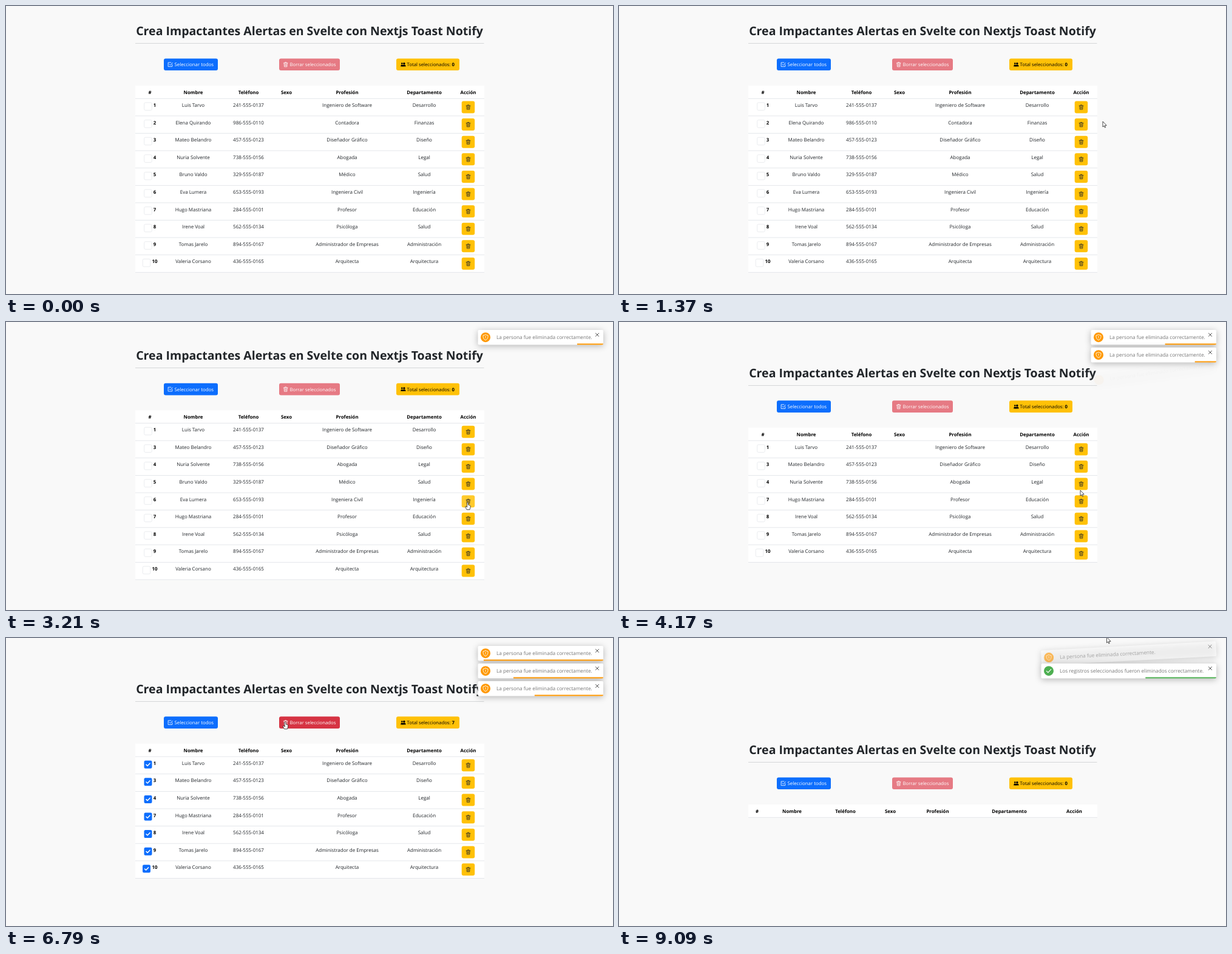
Animation of 1000 by 474 pixels, one loop 9.19 s. Source, as an HTML page with a canvas:

```html
<!DOCTYPE html>
<html lang="es">
<head>
<meta charset="utf-8">
<title>Alertas</title>
<style>
html, body { margin: 0; width: 100%; height: 100%; overflow: hidden; background: #f9f9f9; }
canvas { display: block; width: 1000px; height: 474px; }
</style>
</head>
<body>
<canvas id="stage"></canvas>
<script>
const W = 1000, H = 474, LOOP = 9190;
const canvas = document.getElementById('stage');
const ratio = window.devicePixelRatio || 1;
canvas.width = W * ratio;
canvas.height = H * ratio;
const ctx = canvas.getContext('2d');
ctx.scale(ratio, ratio);
ctx.textRendering = 'geometricPrecision';

const FONT = '"Open Sans", "Noto Sans", sans-serif';
const INK = '#212529', BLUE = '#0d6efd', YELLOW = '#ffc107';
const ROW = 28.6;

const HEADERS = ['#', 'Nombre', 'Teléfono', 'Sexo', 'Profesión', 'Departamento', 'Acción'];
const COLUMNS = [237, 308.5, 399.5, 462, 562, 689, 761.5];
const EMPTY_COLUMNS = [227.5, 285, 373, 447, 525, 643, 750];

const PEOPLE = [
  ['Luis Tarvo', '241-555-0137', 'Ingeniero de Software', 'Desarrollo'],
  ['Elena Quirando', '986-555-0110', 'Contadora', 'Finanzas'],
  ['Mateo Belandro', '457-555-0123', 'Diseñador Gráfico', 'Diseño'],
  ['Nuria Solvente', '738-555-0156', 'Abogada', 'Legal'],
  ['Bruno Valdo', '329-555-0187', 'Médico', 'Salud'],
  ['Eva Lumera', '653-555-0193', 'Ingeniera Civil', 'Ingeniería'],
  ['Hugo Mastriana', '284-555-0101', 'Profesor', 'Educación'],
  ['Irene Voal', '562-555-0134', 'Psicóloga', 'Salud'],
  ['Tomas Jarelo', '894-555-0167', 'Administrador de Empresas', 'Administración'],
  ['Valeria Corsano', '436-555-0165', 'Arquitecta', 'Arquitectura']
].map((cells, i) => ({ id: i + 1, cells }));

const SELECT_ALL = 5100, CLEAR_ALL = 7150;
const REMOVED_AT = { 2: 2210, 6: 3350, 5: 4160 };

const ONE = 'La persona fue eliminada correctamente.';
const MANY = 'Los registros seleccionados fueron eliminados correctamente.';
const TOASTS = [
  { start: 2210, text: ONE },
  { start: 3350, text: ONE },
  { start: 4160, text: ONE },
  { start: CLEAR_ALL, text: MANY, success: true }
];
const TOAST_LIFE = 4800, TOAST_IN = 300, TOAST_OUT = 350, TILT = -8 * Math.PI / 180;

// time, x, y of the pointer tip
const POINTER = [
  [1220, 812, 191], [1370, 797, 190], [1470, 793, 191], [1630, 793, 191],
  [2000, 761, 193], [2630, 761, 193], [3100, 760.5, 297], [3600, 760.5, 297],
  [3950, 760, 277], [4550, 760, 277], [5000, 319.5, 141], [5550, 319.5, 141],
  [6430, 452, 152], [6530, 452, 152], [6750, 460, 138], [7200, 460, 138]
];
const POINTER_BACK = [[8820, 804, -12], [8930, 803.5, -1], [LOOP, 803.5, -1]];

const clamp = v => Math.max(0, Math.min(1, v));
const smooth = v => v * v * (3 - 2 * v);

function follow(path, t) {
  for (let i = 1; i < path.length; i++) {
    const [t0, x0, y0] = path[i - 1], [t1, x1, y1] = path[i];
    if (t >= t0 && t < t1) {
      const k = smooth((t - t0) / (t1 - t0));
      return { x: x0 + (x1 - x0) * k, y: y0 + (y1 - y0) * k };
    }
  }
  return null;
}

function label(text, x, y, size, { bold = false, color = INK, align = 'center' } = {}) {
  ctx.font = `${bold ? 700 : 400} ${size}px ${FONT}`;
  ctx.fillStyle = color;
  ctx.textAlign = align;
  ctx.fillText(text, x, y);
  return ctx.measureText(text).width;
}

function box(x, y, w, h, r, fill) {
  ctx.beginPath();
  ctx.roundRect(x, y, w, h, r);
  ctx.fillStyle = fill;
  ctx.fill();
}

function trace(points, close) {
  ctx.beginPath();
  points.forEach(([x, y], i) => i ? ctx.lineTo(x, y) : ctx.moveTo(x, y));
  if (close) ctx.closePath();
}

function lines(color, width, ...paths) {
  ctx.strokeStyle = color;
  ctx.lineWidth = width;
  ctx.lineCap = ctx.lineJoin = 'round';
  for (const p of paths) { trace(p); ctx.stroke(); }
}

function at(x, y, draw) {
  ctx.save();
  ctx.translate(x, y);
  draw();
  ctx.restore();
}

function trashIcon(x, y, color) {
  at(x, y, () => lines(color, 0.75,
    [[-3.4, -2.4], [3.4, -2.4]],
    [[-1.3, -2.5], [-1.1, -3.7], [1.1, -3.7], [1.3, -2.5]],
    [[-2.7, -2.2], [-2.2, 3.7], [2.2, 3.7], [2.7, -2.2]],
    [[-0.9, -0.8], [-0.8, 2.3]], [[0.9, -0.8], [0.8, 2.3]]));
}

function checkIcon(x, y) {
  at(x, y, () => lines('#fff', 0.8,
    [[1.4, -3.3], [-3.4, -3.3], [-3.4, 3.4], [3.3, 3.4], [3.3, 0]],
    [[-1.7, -0.6], [0.1, 1.2], [3.9, -2.8]]));
}

function peopleIcon(x, y) {
  ctx.fillStyle = '#000';
  for (const [dx, r] of [[-2, 1.3], [1.6, 1.7]]) {
    ctx.beginPath();
    ctx.arc(x + dx, y - 1.7, r, 0, 7);
    ctx.fill();
    ctx.beginPath();
    ctx.ellipse(x + dx, y + 3.2, r * 1.6, 2.9, 0, Math.PI, 0);
    ctx.fill();
  }
}

const inside = (p, x, y, w, h) => !!p && p.x >= x && p.x <= x + w && p.y >= y && p.y <= y + h;

function checkbox(x, y, checked) {
  if (checked) {
    box(x - 6.5, y - 6.5, 13, 13, 2.2, BLUE);
    lines('#fff', 1.5, [[x - 3, y + 0.2], [x - 0.9, y + 2.2], [x + 3.1, y - 2]]);
  } else {
    box(x - 6.3, y - 6.3, 12.6, 12.6, 2, '#fff');
    ctx.strokeStyle = '#e1e4e8';
    ctx.lineWidth = 0.7;
    ctx.stroke();
  }
}

function page(t, pointer) {
  const rows = t >= CLEAR_ALL ? [] : PEOPLE.filter(p => !(t >= REMOVED_AT[p.id]));
  const selected = t >= SELECT_ALL && t < CLEAR_ALL;
  const top = (10 - rows.length) * ROW / 2;
  let hand = false;
  const hover = (...area) => {
    const hit = inside(pointer, ...area);
    hand = hand || hit;
    return hit;
  };

  label('Crea Impactantes Alertas en Svelte con Nextjs Toast Notify', 500, top + 48, 19.55, { bold: true });
  ctx.fillStyle = '#d5d7d8';
  ctx.fillRect(213, Math.round(top + 61), 574.5, 1);

  const by = top + 86.4, ty = top + 99.2, iy = top + 96.3;
  box(260, by, 89, 19.7, 3, hover(260, by, 89, 19.7) ? '#0b5ed7' : BLUE);
  checkIcon(270.5, iy);
  label('Seleccionar todos', 277.5, ty, 7.85, { color: '#fff', align: 'left' });

  const red = !selected ? '#e67a84' : hover(450, by, 100, 19.7) ? '#d63343' : '#dc3545';
  box(450, by, 100, 19.7, 3, red);
  trashIcon(460.7, iy, '#fff');
  label('Borrar seleccionados', 467.5, ty, 7.75, { color: '#fff', align: 'left' });

  box(643, by, 104, 19.7, 3, YELLOW);
  peopleIcon(654.3, iy);
  const w = label('Total seleccionados: ', 660.5, ty, 7.75, { color: '#000', align: 'left' });
  label(selected ? rows.length : 0, 660.5 + w, ty, 7.75, { bold: true, color: '#000', align: 'left' });

  const body = top + 152.3;
  ctx.fillStyle = '#fff';
  ctx.fillRect(213, top + 131, 575, 21.3 + rows.length * ROW);
  const columns = rows.length ? COLUMNS : EMPTY_COLUMNS;
  HEADERS.forEach((h, i) => label(h, columns[i], top + 144.8, 7.85, { bold: true, color: '#000' }));
  ctx.fillStyle = '#dee2e6';
  for (let i = 0; i <= rows.length; i++) ctx.fillRect(213, body + i * ROW - 0.4, 575, 0.8);

  rows.forEach(({ id, cells }, i) => {
    const y = body + i * ROW;
    checkbox(id > 9 ? 231.5 : 234, y + 13, selected);
    label(id, 245, y + 13.6, 7.85, { bold: true, color: '#000' });
    [1, 2, 4, 5].forEach((c, k) => label(cells[k], COLUMNS[c], y + 13.6, 8));
    const area = [750.7, y + 4.2, 21.5, 20];
    box(...area, 3, hover(...area) ? '#ffca2c' : YELLOW);
    trashIcon(761.5, y + 14.2, '#212529');
  });
  return hand;
}

function toastIcon(x, y, toast, age) {
  ctx.save();
  if (toast.success) ctx.globalAlpha *= 0.75 + 0.25 * Math.cos(age / 1000 * Math.PI);
  ctx.translate(x, y);
  ctx.beginPath();
  ctx.arc(0, 0, 8, 0, 7);
  ctx.fillStyle = toast.success ? '#4caf50' : '#ff9800';
  ctx.fill();
  if (toast.success) {
    lines('#fff', 1.2, [[-3.6, 0.2], [-1.2, 2.7], [3.7, -2.5]]);
  } else {
    ctx.beginPath();
    ctx.moveTo(0, -4.6);
    ctx.quadraticCurveTo(2, -3.1, 4, -3.2);
    ctx.quadraticCurveTo(4.6, 2.6, 0, 4.8);
    ctx.quadraticCurveTo(-4.6, 2.6, -4, -3.2);
    ctx.quadraticCurveTo(-2, -3.1, 0, -4.6);
    ctx.strokeStyle = '#fff';
    ctx.lineWidth = 0.9;
    ctx.stroke();
    lines('#fff', 0.9, [[0, -1.7], [0, 0.5]], [[0, 2], [0, 2.1]]);
  }
  ctx.restore();
}

function drawToast(toast, slot, width, t) {
  const age = t - toast.start;
  const gone = Math.max(1 - clamp(age / TOAST_IN), clamp((age - TOAST_LIFE) / TOAST_OUT));
  const h = 24.5;
  ctx.save();
  ctx.globalAlpha = 1 - gone;
  ctx.translate(984 - width / 2, 13 + slot * 29 + h / 2);
  ctx.rotate(TILT * gone);
  ctx.translate(-width / 2, -h / 2);

  ctx.shadowColor = 'rgba(0,0,0,0.28)';
  ctx.shadowBlur = 11 * ratio;
  ctx.shadowOffsetY = 2 * ratio;
  box(0, 0, width, h, 2, '#fff');
  ctx.shadowColor = 'transparent';

  toastIcon(12.5, 12.2, toast, age);
  label(toast.text, 30.5, 15.4, 8.24, { color: '#757575', align: 'left' });
  const cx = width - 10, cy = 8, d = 2.6;
  lines('#444', 0.9, [[cx - d, cy - d], [cx + d, cy + d]], [[cx + d, cy - d], [cx - d, cy + d]]);

  if (age < TOAST_LIFE) {
    const bar = width * age / TOAST_LIFE;
    box(width - bar, h - 2.1, bar, 2.1, [0, 0, 2, 0], toast.success ? '#4caf50' : '#ff9800');
  }
  ctx.restore();
}

function drawPointer({ x, y }, hand) {
  at(x, y, () => {
    if (hand) {
      trace([[-1, 0.6], [-0.4, 0], [0.4, 0], [1, 0.6], [1.1, 4], [3.8, 4.7], [4.6, 5.6],
        [4.5, 8.4], [3.5, 11.8], [-1.4, 11.8], [-3.7, 8], [-3.5, 6.7], [-2.5, 6.6], [-1, 7.8]], true);
    } else {
      trace([[0, 0], [0, 9], [2, 7.2], [3.4, 10.2], [4.7, 9.6], [3.4, 6.7], [6.2, 6.5]], true);
    }
    ctx.fillStyle = '#fff';
    ctx.fill();
    ctx.strokeStyle = '#222';
    ctx.lineWidth = 0.8;
    ctx.lineJoin = 'round';
    ctx.stroke();
  });
}

function draw(t) {
  ctx.fillStyle = '#f9f9f9';
  ctx.fillRect(0, 0, W, H);
  const pointer = follow(POINTER, t) || follow(POINTER_BACK, t);
  const hand = page(t, pointer);
  const live = TOASTS.filter(n => t >= n.start && t < n.start + TOAST_LIFE + TOAST_OUT);
  const width = live.some(n => n.success) ? 288.5 : 206.5;
  live.forEach((n, slot) => drawToast(n, slot, width, t));
  if (pointer) drawPointer(pointer, hand);
}

const begun = performance.now();
function frame() {
  draw((performance.now() - begun) % LOOP);
  requestAnimationFrame(frame);
}
frame();
</script>
</body>
</html>
```
